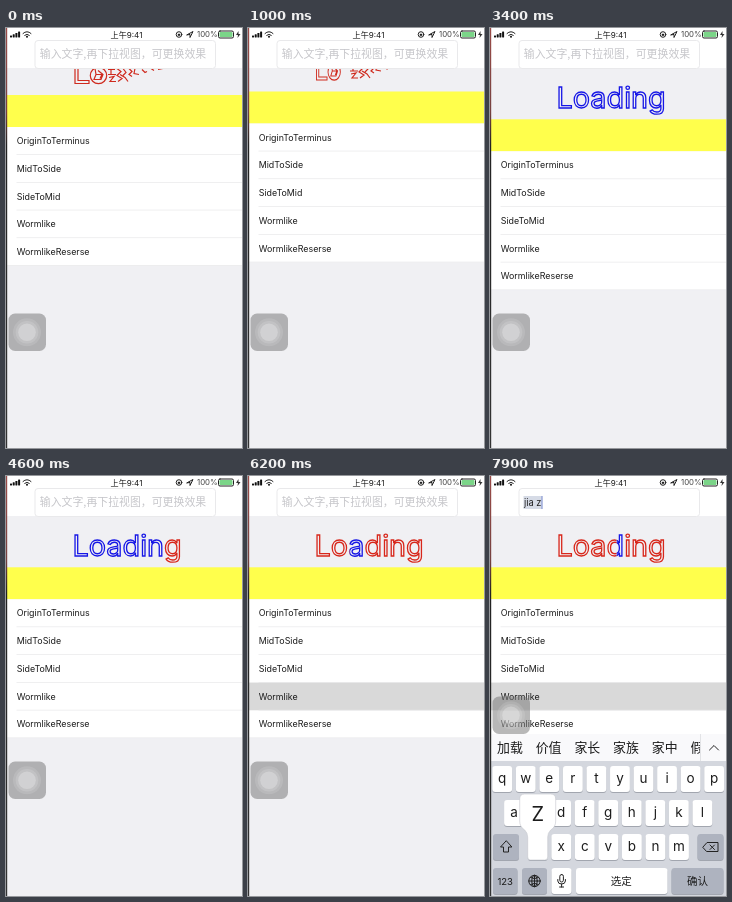
These frames come from a looping animation (236 by 420 pixels, 8000 ms). An HTML page:

```html
<!DOCTYPE html>
<html lang="zh">
<head>
<meta charset="utf-8">
<style>
html, body { margin: 0; width: 100%; height: 100%; overflow: hidden; background: #f0f0f3; }
svg { display: block; width: 100%; height: 100%; font-family: Inter, "Noto Sans CJK SC", "Noto Sans CJK", sans-serif; }
.title text { font-size: 28.8px; fill: none; stroke-width: 1.3; }
.cjk { font-family: "Noto Sans CJK SC", "Noto Sans CJK", sans-serif; }
.mid { text-anchor: middle; }
.line { fill: none; stroke: #222; stroke-width: 1; stroke-linecap: round; stroke-linejoin: round; }
</style>
</head>
<body>
<svg viewBox="0 0 236 420">
  <defs>
    <clipPath id="redClip">
      <rect id="redBefore" y="-40" height="60"/><rect id="redAfter" y="-40" height="60"/>
    </clipPath>
    <clipPath id="blueClip"><rect id="blueWindow" y="-40" height="60"/></clipPath>
    <linearGradient id="edge" x2="0" y2="1">
      <stop offset="0" stop-color="#9a4b48"/><stop offset=".2" stop-color="#76413f"/>
      <stop offset=".28" stop-color="#222"/><stop offset="1" stop-color="#333"/>
    </linearGradient>
  </defs>
  <rect width="236" height="420" fill="#f0f0f3"/>

  <g id="title" class="title">
    <g clip-path="url(#redClip)"><text x="66.500" stroke="#d8261a">Loading</text></g>
    <g clip-path="url(#blueClip)"><text x="66.500" stroke="#1616e6">Loading</text></g>
  </g>
  <g id="scribble" fill="none" stroke="#cf2a1e" stroke-width="1.200">
    <g id="firstLetters">
      <path d="M69-20V0H83V-3H72V-20"/>
      <circle cx="92.500" cy="-8" r="8.200"/>
      <path d="M89-15L90-9L88-4H95L97-9L92-13M90-9H96L94-5"/>
    </g>
    <path d="M102-14H109M105-17V-9M102-9H110M103-6L108-7L104-2H110M111-15L115-12L111-8L116-5L112-2M114-9L119-6L122-2M117-15L120-11L117-8M123-15L126-12L123-9L126-7M129-15L128-10L133-9M136-14L139-11L141-12M145-15L148-13M152-14L157-15"/>
  </g>
  <g id="table"></g>

  <rect width="236" height="40" fill="#fff"/>
  <rect x="29" y="12.500" width="180.500" height="28" rx="3" fill="#fff" stroke="#e9e9eb"/>
  <text id="placeholder" class="cjk" x="33.800" y="30" font-size="10.900" font-weight="300" fill="#c6c6ca">输入文字,再下拉视图，可更换效果</text>
  <g id="entry">
    <rect id="marked" x="33.500" y="20" height="13" fill="#d6dbe6"/>
    <text id="typed" x="34" y="29.500" font-size="9.300" fill="#222"></text>
    <rect id="caret" y="20" width="1" height="13" fill="#6c80c8"/>
  </g>
  <g id="status"></g>
  <g id="keyboard"></g>
  <g id="assist">
    <rect x="2.500" width="37.500" height="37.500" rx="6.500" fill="#777" fill-opacity=".52"/>
    <circle cx="21" cy="18.800" r="14" fill="#fff" fill-opacity=".12"/>
    <circle cx="21" cy="18.800" r="11.300" fill="#fff" fill-opacity=".14"/>
    <circle cx="21" cy="18.800" r="8.800" fill="#fff" fill-opacity=".26"/>
  </g>
  <rect width="1.200" height="420" fill="url(#edge)"/>
</svg>
<script>
const LOOP = 8000, REST = 67, HEADER = 32, ROW = 27.75, CYCLE = 1421;
const byId = id => document.getElementById(id);

function add(parent, tag, attrs = {}, text) {
  const node = document.createElementNS('http://www.w3.org/2000/svg', tag);
  for (const name in attrs) node.setAttribute(name, attrs[name]);
  if (text !== undefined) node.textContent = text;
  parent.appendChild(node);
  return node;
}
const box = (parent, x, y, width, height, fill, rx = 0) =>
  add(parent, 'rect', { x, y, width, height, fill, rx });
const label = (parent, x, y, size, text, more = {}) =>
  add(parent, 'text', { x, y, 'font-size': size, fill: '#1c1c1c', ...more }, text);
const line = (parent, d, more = {}) => add(parent, 'path', { d, class: 'line', ...more });
const show = (node, on) => node.setAttribute('visibility', on ? 'visible' : 'hidden');
const move = (node, y) => node.setAttribute('transform', `translate(0 ${y})`);

// Status bar
const status = byId('status');
[2, 3.200, 4.500, 6].forEach((h, i) => box(status, 4 + i * 2.700, 9.500 - h, 2, h, '#111', .4));
line(status, 'M17 5.500Q21 1.800 25 5.500M18.700 7.300Q21 5.200 23.300 7.300', { 'stroke-width': 1.300 });
add(status, 'circle', { cx: 21, cy: 8.800, r: 1, fill: '#111' });
label(status, 120.500, 9.500, 8.100, '上午9:41', { class: 'mid' });
add(status, 'circle', { cx: 173, cy: 6.500, r: 2.800, class: 'line', 'stroke-width': .8 });
box(status, 171.800, 5.800, 2.400, 2, '#222');
line(status, 'M181 6.800L187 3.500L184 9.500V6.800Z', { 'stroke-width': .8 });
label(status, 191, 9.300, 7.800, '100%', { fill: '#444' });
add(status, 'rect', { x: 212.500, y: 3, width: 15, height: 7, rx: 1.500, class: 'line', 'stroke-width': .6, stroke: '#aaa' });
box(status, 213.500, 4, 13, 5, '#7bd588', .8);
add(status, 'path', { d: 'M232.500 3L230 7H232L231.500 10L234.500 6H232.500Z', fill: '#333' });

// Table, with its origin at the top of the yellow header
const table = byId('table');
box(table, 0, 0, 236, HEADER, '#ffff4c');
box(table, 0, HEADER, 236, ROW * 5, '#fff');
const picked = box(table, 0, HEADER + ROW * 3, 236, ROW, '#d9d9d9');
['OriginToTerminus', 'MidToSide', 'SideToMid', 'Wormlike', 'WormlikeReserse'].forEach((name, i) => {
  const top = HEADER + ROW * i;
  label(table, 10.700, top + 17.100, 8.900, name);
  box(table, i < 4 ? 10.500 : 0, top + ROW - .5, 236, .6, '#e4e4e6');
});

// Keyboard
const keyboard = byId('keyboard'), centers = {};
box(keyboard, 0, 258, 236, 162, '#d4d7de');
box(keyboard, 0, 258, 236, 27, '#f9f9fb');
function key(x, y, w, fill = '#fff') {
  box(keyboard, x, y + 1, w, 26, '#a2a6af', 3);
  box(keyboard, x, y, w, 26, fill, 3);
}
[['qwertyuiop', 12.200, 290], ['asdfghjkl', 24, 324], ['zxcvbnm', 47.700, 358]].forEach(([letters, x0, y]) => {
  [...letters].forEach((letter, i) => {
    const x = x0 + i * 23.550;
    centers[letter] = [x, y];
    key(x - 9.900, y, 19.800);
    label(keyboard, x, y + 17.300, 13.500, letter, { class: 'mid' });
  });
});
const GREY = '#aeb3bf';
key(3, 358, 26, GREY);
key(207.500, 358, 26, GREY);
key(3, 392, 24.500, GREY);
key(32, 392, 25, GREY);
key(61.500, 392, 20);
key(86, 392, 91.500);
key(181.500, 392, 52, GREY);
line(keyboard, 'M16 365L10.500 371H13.500V376H18.500V371H21.500Z');
line(keyboard, 'M213 371L217 366.500H228V375.500H217ZM220 369L224.500 373.500M224.500 369L220 373.500');
label(keyboard, 15.200, 408.500, 9.500, '123', { class: 'mid' });
line(keyboard, 'M38.800 405H50.200M44.500 399.300V410.700M40.500 401.500Q44.500 404 48.500 401.500M40.500 408.500Q44.500 406 48.500 408.500', { 'stroke-width': .8 });
add(keyboard, 'circle', { cx: 44.500, cy: 405, r: 5.700, class: 'line' });
add(keyboard, 'ellipse', { cx: 44.500, cy: 405, rx: 2.700, ry: 5.700, class: 'line', 'stroke-width': .8 });
add(keyboard, 'rect', { x: 69.800, y: 398.500, width: 3.600, height: 7.500, rx: 1.800, class: 'line' });
line(keyboard, 'M67.800 403.500V405Q68 408 71.600 408Q75.200 408 75.400 405V403.500M71.600 408V411M69.600 411H73.600');
const spaceLabel = label(keyboard, 131.200, 408.800, 10.500, '', { class: 'mid cjk' });
const enterLabel = label(keyboard, 207.500, 408.800, 10.500, '', { class: 'mid cjk' });

const candidates = add(keyboard, 'g');
['加载', '价值', '家长', '家族', '家中', '假'].forEach((word, i) =>
  label(candidates, 7 + i * 38.700, 276.200, 12.900, word, { class: 'cjk' }));
box(candidates, 210, 258, 26, 27, '#f9f9fb');
box(candidates, 210, 258, .6, 27, '#d2d4d9');
line(candidates, 'M219.500 274L224 269.500L228.500 274', { stroke: '#555' });

const popup = add(keyboard, 'g');
add(popup, 'path', {
  d: 'M-13-40H13Q18-40 18-35V-13Q18-7 13-4Q10-1 10 3V23Q10 26 7 26H-7Q-10 26-10 23V3Q-10-1-13-4Q-18-7-18-13V-35Q-18-40-13-40Z',
  fill: '#fff', stroke: '#c4c7cd', 'stroke-width': .6
});
const popupLabel = label(popup, 0, -13.500, 20, '', { class: 'mid' });

// Each stop is [time, value]; values ease in between
function ease(t, stops) {
  if (t <= stops[0][0]) return stops[0][1];
  for (let i = 1; i < stops.length; i++) {
    const [t0, a] = stops[i - 1], [t1, b] = stops[i];
    if (t < t1) {
      const u = (t - t0) / (t1 - t0);
      return a + (b - a) * u * u * (3 - 2 * u);
    }
  }
  return stops[stops.length - 1][1];
}

const PULL = [[0, 67], [650, 67], [1000, 63.500], [1150, 64.500], [1700, 99.500], [1820, 99.500], [2080, 91.300],
  [4980, 91.300], [5250, REST], [5410, REST], [5640, 97], [5880, 91.300]];
const STROKES = [[7100, 'j'], [7330, 'i'], [7560, 'a'], [7830, 'z']];

function setWindow(id, x, width) {
  byId(id).setAttribute('x', x);
  byId(id).setAttribute('width', Math.max(0, width));
}

function drawTitle(t, y) {
  const pull = (y - REST) / 24;
  move(byId('title'), y - 11.500);
  move(byId('scribble'), y - 11.500);
  byId('scribble').setAttribute('opacity', Math.max(0, Math.min(1, 1 - pull * 1.400)));
  const squeeze = 1 + 1.700 * Math.min(0, pull);
  byId('firstLetters').setAttribute('transform', `translate(${67 * (1 - squeeze)} 0) scale(${squeeze} 1)`);

  const first = t >= 1981 && t < 4980, second = t >= 5651;
  let x = 60, width = 0;
  if (first) {
    width = 6 + 110 * ((t - 1981) / CYCLE % 1);
  } else if (second) {
    const phase = (t - 5651) / CYCLE % 1;
    width = 10.500 + 3.500 * Math.cos(16 * (phase - .386));
    x = 66 + 110 * phase - width / 2;
  }
  const right = pull < .04 ? 60 : pull < .8 ? 100 + 95 * pull : 190;
  setWindow('blueWindow', x, width);
  setWindow('redBefore', 60, x - 60);
  setWindow('redAfter', x + width, right - x - width);
}

function drawTyping(t) {
  const done = STROKES.filter(([at]) => t >= at);
  const text = done.map(([, c]) => c === 'z' ? ' z' : c).join('');
  const typed = byId('typed'), editing = t >= 6550;
  typed.textContent = text;
  const width = text ? typed.getComputedTextLength() : 0;
  byId('marked').setAttribute('width', width ? width + .5 : 0);
  byId('caret').setAttribute('x', 34 + width);
  show(byId('entry'), editing);
  show(byId('placeholder'), !text);
  show(candidates, !!text);
  spaceLabel.textContent = text ? '选定' : '空格';
  enterLabel.textContent = text ? '确认' : '换行';
  const last = done[done.length - 1];
  const pressed = last && t < last[0] + 170;
  show(popup, pressed);
  if (pressed) {
    const [x, y] = centers[last[1]];
    popup.setAttribute('transform', `translate(${x} ${y})`);
    popupLabel.textContent = last[1].toUpperCase();
  }
}

function update(t) {
  const y = ease(t, PULL);
  move(table, y);
  show(picked, t >= 5330);
  drawTitle(t, y);
  drawTyping(t);
  move(keyboard, ease(t, [[6550, 164], [6850, 0]]));
  move(byId('assist'), ease(t, [[6550, 285.500], [6850, 220.500]]));
}

const start = performance.now();
function frame() {
  update((performance.now() - start) % LOOP);
  requestAnimationFrame(frame);
}
update(0);
requestAnimationFrame(frame);
</script>
</body>
</html>
```
